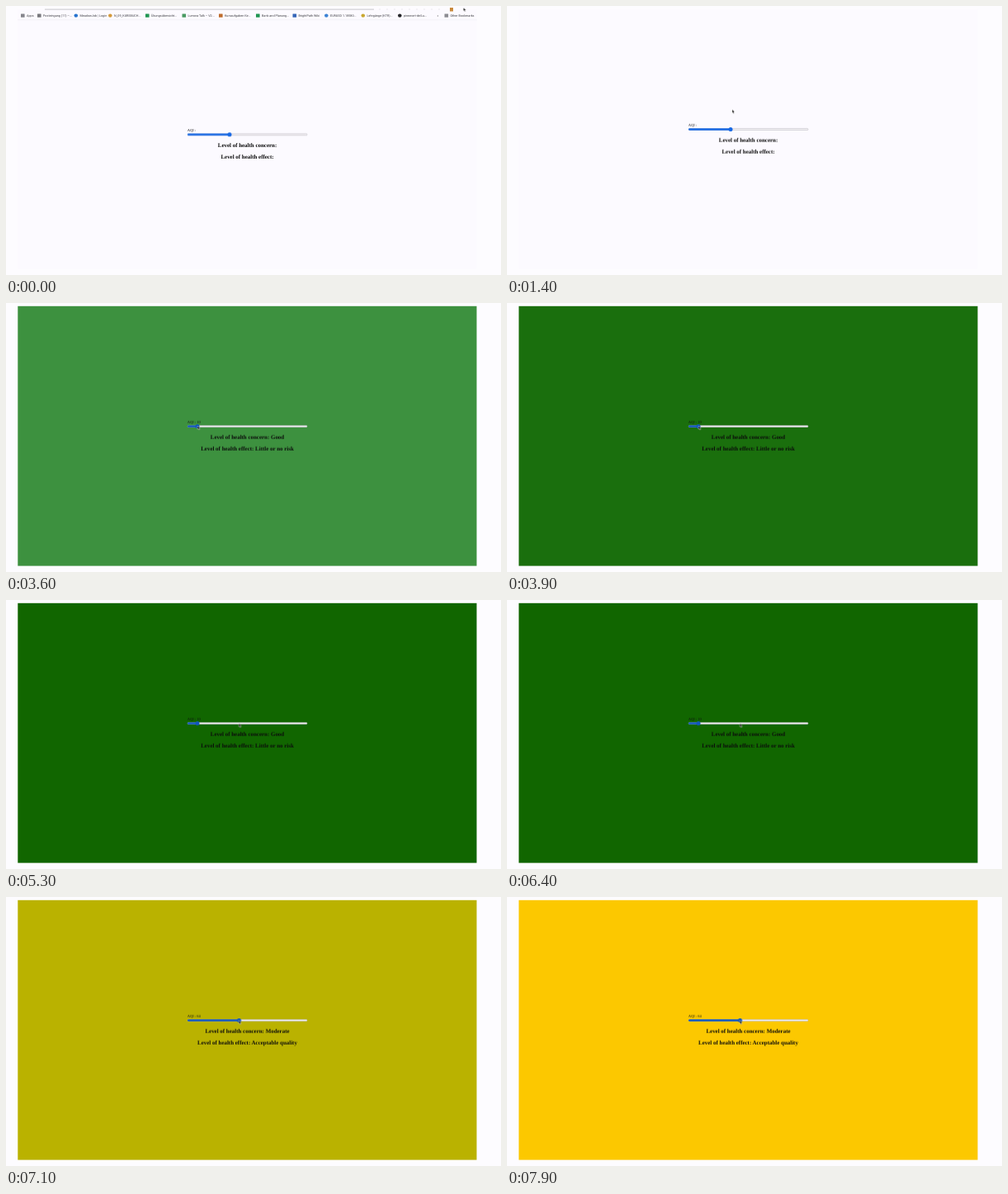
Write an HTML page that moves like this. It is 600x326 px and loops after 8000 ms.

```html
<!DOCTYPE html>
<html lang="en">
<head>
<meta charset="utf-8">
<title>Air quality slider</title>
<style>
  html, body { margin: 0; width: 100%; height: 100%; overflow: hidden; background: #fdfcff; }
  svg { display: block; width: 600px; height: 326px; }
  text { text-rendering: geometricPrecision; }
  #panel { fill: #fcfaff; }
  #bar text { font: 3.75px Roboto, Arial, sans-serif; fill: #3c3c40; }
  .label { font: 4.5px "Liberation Serif", Times, serif; fill: #111; }
  .line { font: bold 6.95px "Liberation Serif", Times, serif; text-anchor: middle; fill: #0c0c0c; }
</style>
</head>
<body>
<svg viewBox="0 0 600 326">
  <rect id="panel" x="14.3" y="3.8" width="556.2" height="314.8"/>
  <g id="bar">
    <path d="M47 4.2H446" stroke="#d2d0d5" stroke-width="1.2"/>
    <path d="M14 16.8H571" stroke="#eeecf1" stroke-width=".6"/>
    <path d="M452 4H531" stroke="#e6e4e9" stroke-width=".8" stroke-dasharray="2 7"/>
    <rect x="538" y="2" width="4" height="4.5" fill="#c98a3c"/>
  </g>
  <g id="content">
    <text class="label" x="219.8" y="145.5">AQI :</text>
    <text class="label" x="231.2" y="145.5" id="low">10</text>
    <text class="label" x="231.2" y="145.5" id="mid">64</text>
    <rect x="220.2" y="148.4" width="144.8" height="2.2" rx="1.1" fill="#efedf1" stroke="#b9b7bc" stroke-width=".5"/>
    <g id="blue">
      <rect id="fill" x="220" y="148.2" width="51" height="2.6" rx="1.3"/>
      <circle id="thumb" cy="149.5" r="2.5"/>
    </g>
    <g id="messages"></g>
  </g>
  <path id="cursor" d="M0 0V4.2L1 3.3L1.7 4.9L2.4 4.6L1.7 3.1H3Z" fill="#111" stroke="#fff" stroke-width=".35"/>
</svg>
<script>
const LOOP = 8000;
const GOOD = 3350, MODERATE = 6560;
const $ = id => document.getElementById(id);

function add(parent, tag, attrs, text = "") {
  const el = document.createElementNS("http://www.w3.org/2000/svg", tag);
  for (const key in attrs) el.setAttribute(key, attrs[key]);
  el.textContent = text;
  return parent.appendChild(el);
}

// Each step: [time in ms, value, easing towards the next step]
function play(el, property, steps) {
  const frames = steps.map(([ms, value, easing = "linear"]) =>
    ({ offset: ms / LOOP, [property]: value, easing }));
  frames.push({ offset: 1, [property]: steps.at(-1)[1] });
  el.animate(frames, { duration: LOOP, iterations: Infinity });
}

function showBetween(el, from, to) {
  const hard = "steps(1, end)";
  const steps = [[0, from ? 0 : 1, hard]];
  if (from) steps.push([from, 1, hard]);
  if (to < LOOP) steps.push([to, 0, hard]);
  play(el, "opacity", steps);
}

// Bookmarks: [icon x, icon colour, round icon, label]
[
  [18, "#85858c", 0, "Apps"],
  [38, "#77777c", 0, "Posteingang (11) –..."],
  [82.5, "#2874cf", 1, "MeadowJob | Login"],
  [124, "#d59a3b", 1, "N_09_KURSBUCH..."],
  [169, "#219653", 0, "Übungsübersicht..."],
  [213.5, "#4a9b62", 0, "Lumora Talk – V2..."],
  [258, "#bf6c2d", 0, "Kursaufgaben für..."],
  [303, "#219653", 0, "Bank and Planung..."],
  [347.5, "#3566b8", 0, "BrightPath Wiki"],
  [386, "#3b82d5", 1, "EURUSD 1.18580..."],
  [430.5, "#c9a831", 1, "Lehrgänge (KTR)..."],
  [475, "#242428", 1, "pinewort-de/Lu..."],
  [531.5, "#8c8c92", 0, "Other Bookmarks"]
].forEach(([x, fill, round, label]) => {
  add($("bar"), "rect", { x, y: 9.4, width: 4.6, height: 4.4, rx: round ? 2.3 : .4, fill });
  add($("bar"), "text", { x: x + 7, y: 12.9 }, label);
});
add($("bar"), "text", { x: 522.5, y: 12.9 }, "»");

// Messages: [start, end, concern, effect]
[
  [0, GOOD, "", ""],
  [GOOD, MODERATE, " Good", " Little or no risk"],
  [MODERATE, LOOP, " Moderate", " Acceptable quality"]
].forEach(([from, to, concern, effect]) => {
  const group = add($("messages"), "g", {});
  add(group, "text", { class: "line", x: 292.5, y: 165.1 }, "Level of health concern:" + concern);
  add(group, "text", { class: "line", x: 292.5, y: 178.9 }, "Level of health effect:" + effect);
  showBetween(group, from, to);
});
showBetween($("low"), GOOD, MODERATE);
showBetween($("mid"), MODERATE, LOOP);

const move = (x, y) => `translate(${x}px, ${y}px)`;

play($("bar"), "transform", [[0, move(0, 0)], [800, move(0, 0), "ease-in-out"], [1150, move(0, -20)]]);
play($("content"), "transform", [[0, move(0, 6.3)], [800, move(0, 6.3), "ease-in-out"], [1150, move(0, 0)]]);

play($("panel"), "fill", [
  [0, "#fcfaff"], [3300, "#fcfaff"], [3600, "#3d913f", "ease-out"], [4100, "#116600"],
  [MODERATE, "#116600", "ease-in"], [6800, "#6b9700", "ease-out"], [7600, "#fcc800"]
]);

const knob = [[0, 271], [2600, 271, "ease-in-out"], [3100, 232], [MODERATE - 1, 232], [MODERATE, 282.5]];
play($("thumb"), "transform", knob.map(([ms, x, ease]) => [ms, move(x, 0), ease]));
play($("fill"), "width", knob.map(([ms, x, ease]) => [ms, `${x - 220}px`, ease]));
play($("blue"), "fill", [[0, "#1768e5"], [2000, "#1768e5"], [2100, "#1257b8"]]);

play($("cursor"), "transform", [
  [0, move(554.5, 2)], [900, move(554.5, 2), "ease-in-out"],
  [1350, move(273, 125.5)], [1700, move(273, 125.5), "ease-in-out"],
  [2100, move(271.2, 149)], [2600, move(271.2, 149), "ease-in-out"],
  [3100, move(232.2, 149)], [4300, move(232.2, 149), "ease-in-out"],
  [5100, move(282.3, 149.6)]
]);
</script>
</body>
</html>
```
